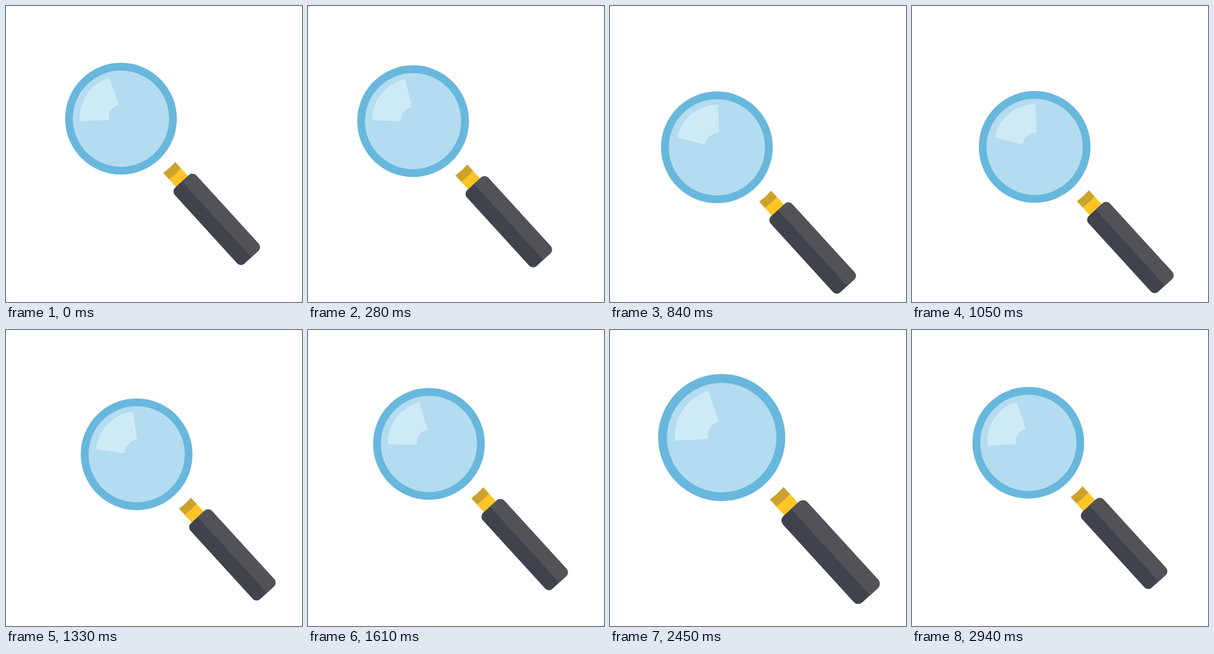
An HTML page for the animation above (3150 ms loop, 480x480 px).

```html
<!DOCTYPE html>
<html lang="en">
<head>
<meta charset="utf-8">
<title>Magnifying glass</title>
<style>
  html, body { margin: 0; height: 100%; overflow: hidden; background: #fff; }
  svg { display: block; width: 100vw; height: 100vh; }
</style>
</head>
<body>
<svg viewBox="0 0 480 480">
  <g id="glass">
    <circle r="84.3" fill="#b3dcf0" stroke="#68b7dd" stroke-width="12.6"/>
    <path id="shine" fill="#cfeaf7" d="M-19-66.5A67.5 67.5 0 0 0-66.3 4.5L-19.7 2A22 22 0 0 1-4-23Z"/>
    <g transform="translate(-.6 .6) rotate(47.6)">
      <path fill="#ffc524" d="M124-18.4H145V7.9H124Z"/>
      <path fill="#cca22e" d="M111.3-18.4Q113-5.3 111.3 7.9H125Q126.6-5.3 125-18.4Z"/>
      <rect x="141.8" y="-29" width="166.7" height="47.2" rx="8.5" fill="#41434c"/>
      <path fill="#525359" d="M141.8-5.3V-20.5A8.5 8.5 0 0 1 150.3-29H300A8.5 8.5 0 0 1 308.5-20.5V-5.3Z"/>
    </g>
  </g>
</svg>
<script>
  const LOOP = 3150, STEP = 70, LAST = 2940;
  const glass = document.getElementById('glass');
  const shine = document.getElementById('shine');

  const part = (t, a, b) => Math.min(1, Math.max(0, (t - a) / (b - a)));
  const ease = (t, a, b) => (1 - Math.cos(Math.PI * part(t, a, b))) / 2;
  const bump = (t, a, b) => Math.sin(Math.PI * part(t, a, b)) ** 2;

  function draw(t) {
    // One counter-clockwise trip round an ellipse, measured from its top
    const degrees = -7 + 360 * ease(t, -70, 1910)
      + 15 * bump(t, -200, 1050) + 4 * bump(t, 1190, 1890);
    const angle = degrees * Math.PI / 180;
    const x = 185.3 - 27.3 * Math.sin(angle);
    const y = 207.2 - 24.5 * Math.cos(angle);

    // Then a zoom in and out about the middle of the stage
    const zoom = 1 + 0.138 * (ease(t, 2100, 2450) - ease(t, 2450, 2940));
    glass.setAttribute('transform',
      `translate(243 244) scale(${zoom}) translate(${x - 243} ${y - 244})`);
    shine.setAttribute('transform', `rotate(${18 * bump(t, -70, 1890)})`);
  }

  const start = performance.now();
  function tick() {
    const t = (performance.now() - start) % LOOP;
    draw(Math.min(LAST, Math.floor(t / STEP) * STEP));
    requestAnimationFrame(tick);
  }
  tick();
</script>
</body>
</html>
```
